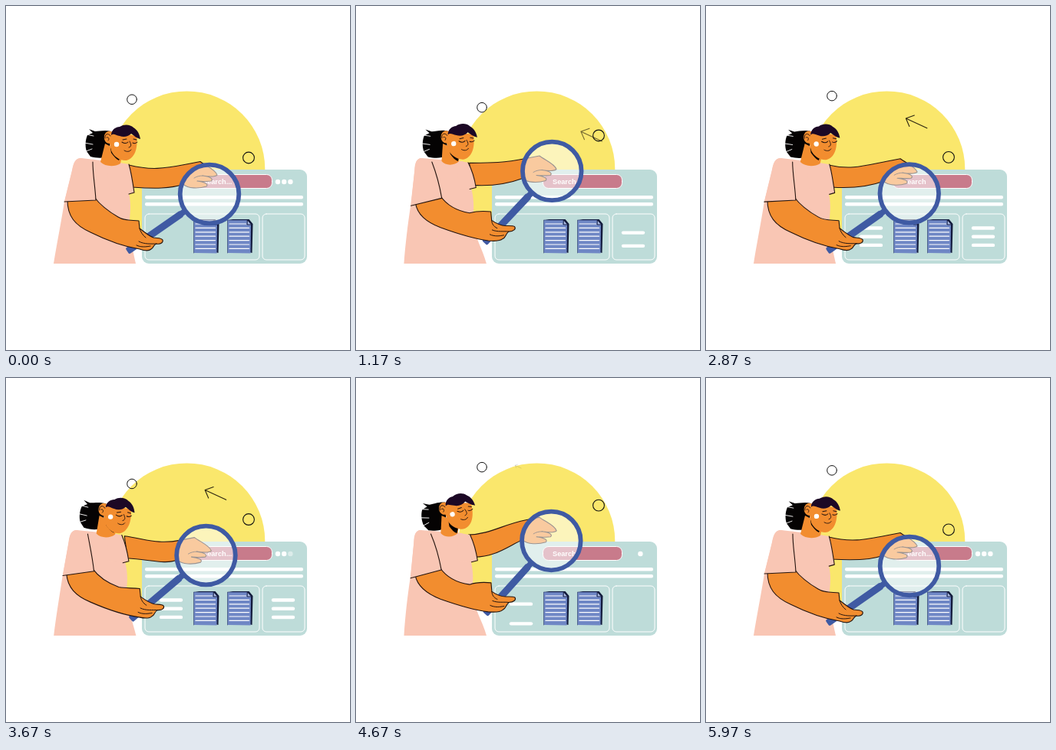
Recreate the animation shown at these times as an HTML page with a canvas. Size 448 by 450 pixels, loop 6010 ms.

```html
<!DOCTYPE html>
<html lang="en">
<head>
<meta charset="utf-8">
<title>Search</title>
<style>
  html, body { margin: 0; width: 100%; height: 100%; overflow: hidden; background: #fff; }
  canvas { display: block; width: 100vw; height: 100vh; }
</style>
</head>
<body>
<canvas id="stage" width="448" height="450"></canvas>
<script>
const ctx = document.getElementById('stage').getContext('2d');
const LOOP = 6010, SWAY = LOOP / 2, BLINK = LOOP / 3;
const INK = '#24140f', SKIN = '#f28d2f', PINK = '#f9c6b4', BLUE = '#3f5aa3', BLACK = '#050303';

const clamp = v => Math.max(0, Math.min(1, v));
const mix = (a, b, k) => a + (b - a) * k;

function paint(path, fill, stroke, width = 1.1) {
  if (fill) { ctx.fillStyle = fill; ctx.fill(path); }
  if (stroke) { ctx.strokeStyle = stroke; ctx.lineWidth = width; ctx.stroke(path); }
}
const draw = (d, fill, stroke, width) => paint(new Path2D(d), fill, stroke, width);

// Blend two path strings that share the same commands.
function blend(a, b, k) {
  const to = b.match(/-?[\d.]+/g);
  let i = 0;
  return a.replace(/-?[\d.]+/g, n => mix(+n, +to[i++], k).toFixed(2));
}

function disc(x, y, r, fill, stroke, width) {
  const c = new Path2D();
  c.arc(x, y, r, 0, Math.PI * 2);
  paint(c, fill, stroke, width);
}

function box(x, y, w, h, r, fill, stroke, width) {
  const b = new Path2D();
  b.roundRect(x, y, w, h, r);
  paint(b, fill, stroke, width);
}

function dotAlpha(t, k) {
  const u = t % BLINK;
  return u < 1000 ? 1 - clamp((u - 290 - k * 195) / 60) : clamp((u - 1240 - k * 200) / 60);
}

function page(x) {
  ctx.save();
  ctx.translate(x, 0);
  draw('M2 279L28 279L33 285L32 323L28 322L27 284Z', '#121a3c');
  draw('M0 280L26 280L26 285L30.5 286L30 323.5L0 323Z', '#6f87c5');
  draw('M0 323L0 280L26 280', null, '#22305f', .6);
  draw('M26 280L31 286L26 286Z', '#a9b9e2', '#121a3c', .9);
  for (let i = 0; i < 7; i++) {
    const y = 285 + i * 5.4;
    draw(`M2.5 ${y}H${i ? 28 : 24}`, null, '#fff', 1.2);
  }
  ctx.restore();
}

// Rows rise from below the panel, then sink again, last row first.
function rows(t, x, start, end) {
  for (let k = 0; k < 3; k++) {
    const rise = clamp((t - start - k * 92) / 700);
    const sink = clamp((t - end + k * 190) / 700);
    const y = 290.5 + k * 11.2 + 46 * ((1 - rise) ** 3 + sink ** 3);
    draw(`M${x + 2} ${y}H${x + 28}`, null, '#fff', 4.4);
  }
}

function browser(t) {
  box(177, 214, 215, 123, 9, '#bedcd9');
  box(243.5, 220.5, 103, 18, 7, '#c87b8b', '#fff', 1);
  ctx.fillStyle = '#fff';
  ctx.font = 'bold 9.2px "Liberation Sans", Arial, sans-serif';
  ctx.fillText('Search', 256, 233);
  const end = 256 + ctx.measureText('Search').width;
  for (let k = 0; k < 3; k++) {
    ctx.fillStyle = '#fff';
    ctx.globalAlpha = dotAlpha(t + 90, k);
    ctx.fillText('.', end + k * 2.6, 233);
    ctx.globalAlpha = dotAlpha(t, k);
    disc(354 + k * 8.2, 230, 3.2, '#fff');
  }
  ctx.globalAlpha = 1;
  box(181, 248, 206, 4.6, 2, '#fff');
  box(181, 257, 206, 4.6, 2, '#fff');
  box(181, 272, 149, 60, 5, null, '#fff', 1);
  box(334, 272, 55, 60, 5, null, '#fff', 1);
  ctx.save();
  ctx.beginPath();
  ctx.rect(181, 272, 208, 60);
  ctx.clip();
  rows(t, 346, 828, 3970);
  rows(t, 200, 1425, 4334);
  ctx.restore();
  page(244.5);
  page(288.5);
}

function arrow(t) {
  if (t < 850 || t > 4780) return;
  const enter = 1 - (1 - clamp((t - 850) / 1230)) ** 2;
  const drift = clamp((t - 2080) / 1700);
  const leave = clamp((t - 3750) / 1000) ** 2;
  const x = 319 - 57.5 * enter - 2.5 * drift - 61 * leave;
  const y = 178 - 30.5 * enter - drift - 38 * leave;
  const size = clamp((t - 850) / 250) * (1 - clamp((t - 4350) / 450));
  ctx.save();
  ctx.globalAlpha = clamp((t - 850) / 480) * (1 - .6 * clamp((t - 4350) / 350));
  ctx.translate(x, y);
  ctx.scale(size, size);
  draw('M27.5 12.8L0 0L11 -4M0 0L4.5 10.5', null, '#2b2410', 1.1);
  ctx.restore();
}

function farArm(p, s) {
  const x = 275 - 14.8 * p - 1.5 * s, y = 221 - 17.5 * p + 12.5 * s;
  const sx = 160 - 14 * p, sy = 208 - 3 * p;
  draw(`M${sx} ${sy}C${sx + 28} ${sy + 7 - 8 * p} ${x - 70} ${y - 8} ${x - 40} ${y - 14}` +
    `L${x - 22} ${y - 17.5}C${x - 15} ${y - 12} ${x - 2} ${y - 7} ${x} ${y}` +
    `C${x - 3} ${y + 3} ${x - 12} ${y + 2} ${x - 19} ${y + 1}` +
    `C${x - 10} ${y + 2} ${x - 4} ${y + 5} ${x - 8} ${y + 8}` +
    `C${x - 15} ${y + 9} ${x - 21} ${y + 8} ${x - 26} ${y + 8}` +
    `C${x - 19} ${y + 9} ${x - 10} ${y + 11} ${x - 14} ${y + 15}` +
    `C${x - 24} ${y + 18} ${x - 38} ${y + 18} ${x - 44} ${y + 12}` +
    `C${x - 60} ${y + 18} ${sx + 34} ${sy + 31} ${sx + 4} ${sy + 29}Z`, SKIN, INK);
  draw(`M${x - 19} ${y + 1}C${x - 23} ${y + 1} ${x - 27} ${y + 2} ${x - 30} ${y + 4}`, null, INK, .9);
}

function glass(p) {
  const x = 265 - 11 * p, y = 246 - 34 * p;
  const hx = 158 + 10.5 * p, hy = 321 - 12.5 * p;
  const a = Math.atan2(hy - y, hx - x), len = Math.hypot(hx - x, hy - y);
  disc(x, y, 38.3, 'rgba(255,255,255,.54)', BLUE, 5.8);
  ctx.save();
  ctx.translate(x, y);
  ctx.rotate(a);
  box(39, -3.8, 10, 7.6, 1, BLUE);
  box(44, -4.6, len - 44, 9.2, 2, BLUE);
  ctx.restore();
}

function torso(p, s) {
  draw(blend(
    'M98 199C90 199 88 206 86 216L76 256C72 282 66 312 62 337L169 337C165 318 160 300 161 278C163 262 162 252 159 242L150 205Z',
    'M84 199C77 199 76 206 75 216L70.5 262C67 285 64 312 62.5 337L170 337C165 318 152 300 151 278C153 262 152 250 149 238L138 203Z', p), PINK);
  const edge = blend('M160 207C163 217 165 230 167 244L160 246', 'M147 205C151 213 155 225 157 238L149 240', p + .3 * s);
  draw(edge + 'L135 240L130 202Z', PINK);
  draw(edge, null, INK);
}

function sleeve(p) {
  const hem = blend('M76 256L117 254C116 235 113 220 113 204', 'M71 262L111 251C108 235 104 220 97 204', p);
  draw(hem + blend('L98 199C90 199 88 205 86 215Z', 'L84 199C77 199 75 206 75 215Z', p), PINK);
  draw(hem, null, INK);
}

function nearArm(p) {
  draw(blend(
    'M80 254C80 275 90 287 110 296C130 306 155 315 174 318C180 320 186 321 189 318C193 316 191 313 196 311C202 312 205 309 204 306C202 303 197 304 192 303C186 301 181 296 174 291L173 281C162 280 154 281 146 276C134 269 124 262 115 250Z',
    'M77 258C80 273 92 282 110 289C130 296 152 303 172 305.5C179 306 188 306 191 303C196 301 194 298 199 293C206 293 209 289 207 286.5C205 285 200 285.5 195 285.5C189 285.5 183 283 177 279L176 267.5C166 266.5 156 267 148 270C132 268 118 261 109 248Z', p), SKIN, INK);
  draw(blend(
    'M174 291C175 295 178 300 182 303M173 308C180 312 190 311 196 311M170 313C176 316 183 315 188 314',
    'M177 279C177 283 179 287 184 289M178 291C185 294 193 292 199 293M175 297C181 300 188 299 193 298', p), null, INK, 1);
}

function headPose(p, s) {
  ctx.translate(144 - 19 * p, 181 - 2.2 * p + 1.6 * s);
  ctx.rotate((-7 * p + 6 * s) * Math.PI / 180);
  ctx.translate(-144, -181);
}

function head(p, s) {
  ctx.save();
  headPose(p, s);
  draw('M137 164C129 162 121 164 116 164L108 161L113 166L106 169C103 176 103 184 105 190L110 197C118 199 127 200 134 196Z', BLACK);
  draw('M104 168L114 170M102 179L113 181M104 190L112 187', null, '#fff', .9);
  ctx.restore();

  draw(blend(
    'M129 180L123 204C129 210 141 211 149 206L152 192Z',
    'M111 180L110 203C115 209 126 209 132 203L134 190Z', p), SKIN);
  draw(blend(
    'M136 186L137 192C140 196 143 200 147 202L152 190Z',
    'M120 187L121 194C124 198 127 202 131 203L134 189Z', p), BLACK);

  ctx.save();
  headPose(p, s);
  draw('M136 164L170 170C172 183 169 199 157 202C149 203 140 197 137 189L135 180C130 180 127 175 128 170C129 165 133 163 136 164Z', SKIN);
  draw('M136 170C133 165 128 168 129 173M131 172C134 171 135 174 133 176', null, INK, .9);
  draw('M137 169C137 162 143 158 148 158C154 154 162 155 166 159C171 162 174 167 175 174C170 173 166 169 163 167C159 171 153 172 148 170C143 169 140 166 137 169Z', '#1c0825');
  draw('M151 178C154 180 157 180 159 178M165 179C167 180 169 180 171 178M152 175L157 174M166 174L170 175', null, INK, 1);
  draw('M161 177C163 181 164 184 160 185M154 189C157 191 161 191 163 188', null, INK, .9);
  disc(144, 181, 3.2, '#fff');
  ctx.restore();
}

function frame(now) {
  const t = now % LOOP;
  const a = t / SWAY * Math.PI * 2;
  const p = (1 - Math.cos(a)) / 2, s = Math.sin(a);
  ctx.fillStyle = '#fff';
  ctx.fillRect(0, 0, 448, 450);
  ctx.lineCap = ctx.lineJoin = 'round';
  disc(235.5, 213.2, 101.8, '#fae76c');
  arrow(t);
  disc(164, 122.2 + 16.5 * s, 6.3, null, '#111', 1);
  disc(316, 198.5 - 32.8 * p, 7.4, null, '#111', 1.1);
  browser(t);
  farArm(p, s);
  torso(p, s);
  glass(p);
  nearArm(p);
  sleeve(p);
  head(p, s);
  requestAnimationFrame(frame);
}
requestAnimationFrame(frame);
</script>
</body>
</html>
```
